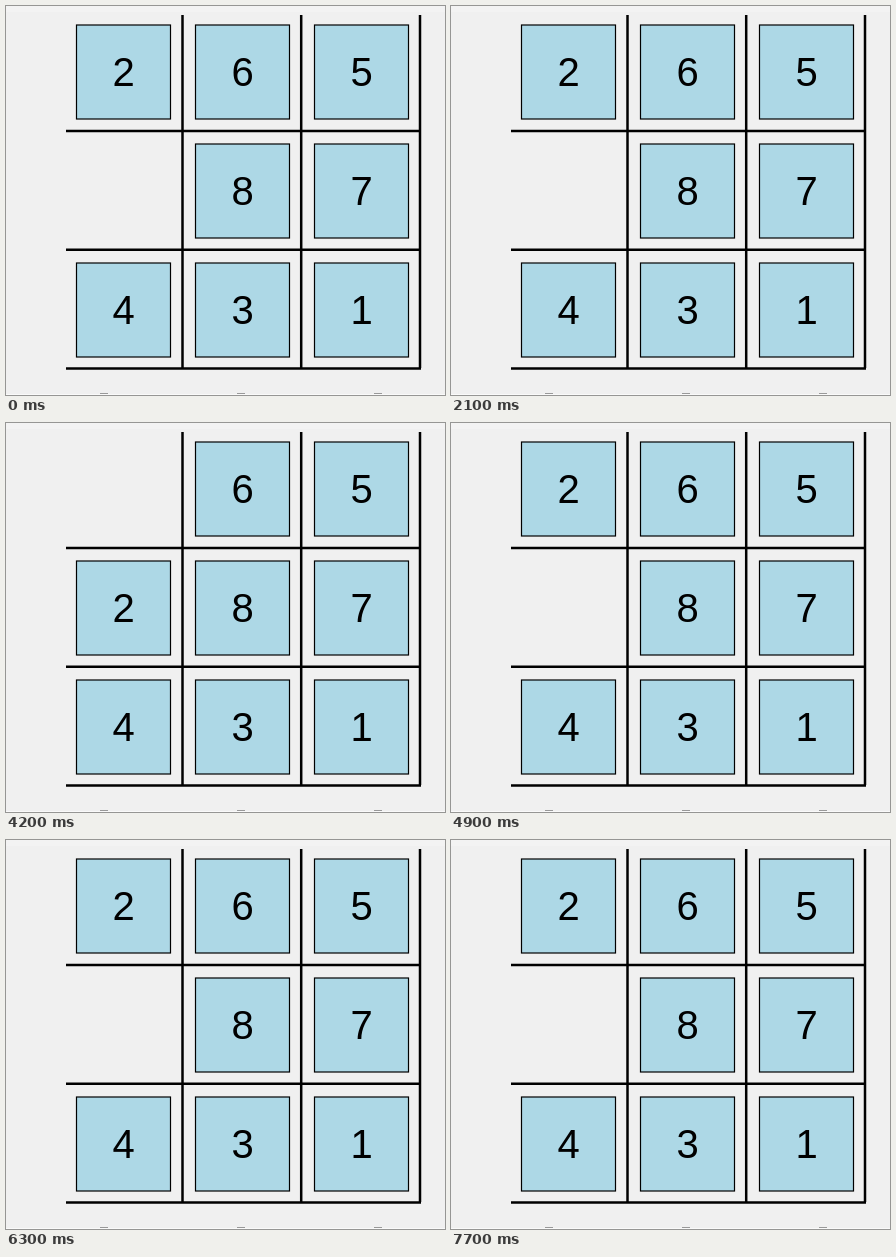
These frames come from a looping animation (439 px wide and 389 px high, 8 s). An HTML page:

```html
<!DOCTYPE html>
<html lang="en">
<head>
<meta charset="utf-8">
<title>Sliding puzzle</title>
<style>
  html, body { margin: 0; width: 100%; height: 100%; overflow: hidden; background: #f0f0f0; }
  svg { display: block; width: 439px; height: 389px; }
  .grid { fill: none; stroke: #000; stroke-width: 2.5; }
  .tile rect { fill: #add8e6; stroke: #000; stroke-width: 1.2; }
  .tile text { font: 40px "Liberation Sans", Arial, sans-serif; text-anchor: middle; }
</style>
</head>
<body>
<svg viewBox="0 0 439 389">
  <rect width="439" height="6" fill="#f3f3f3"/>
  <rect y="388" width="439" height="1" fill="#fafafa"/>
  <path d="M94 387.5h8M231 387.5h8M368 387.5h8" stroke="#999"/>
  <path class="grid" d="M176.5 9V362M295.2 9V362M414 9V362M60 125H414M60 243.7H414M60 362.4H415"/>
  <g id="tiles"></g>
</svg>
<script>
  const NS = "http://www.w3.org/2000/svg";
  const PITCH = 119, LOOP = 8000, STEP = 700;
  const board = ["265", " 87", "431"];
  const tiles = document.getElementById("tiles");

  function add(parent, name, attrs) {
    const el = document.createElementNS(NS, name);
    for (const key in attrs) el.setAttribute(key, attrs[key]);
    return parent.appendChild(el);
  }

  function place(tile, col, row) {
    tile.setAttribute("transform", `translate(${70 + col * PITCH} ${18.5 + row * PITCH})`);
  }

  function addTile(digit, col, row) {
    const tile = add(tiles, "g", { class: "tile" });
    add(tile, "rect", { x: 0.5, y: 0.5, width: 94, height: 94 });
    add(tile, "text", { x: 47.5, y: 61.5 }).textContent = digit;
    place(tile, col, row);
    return tile;
  }

  let mover;
  board.forEach((line, row) => [...line].forEach((digit, col) => {
    if (digit === " ") return;
    const tile = addTile(digit, col, row);
    if (digit === "2") mover = tile;
  }));

  // The "2" hops between the top and middle rows, resting one extra step at the start.
  let start;
  function frame(now) {
    start ??= now;
    const step = Math.floor(((now - start) % LOOP) / STEP);
    place(mover, 0, step >= 2 && step % 2 === 0 ? 1 : 0);
    requestAnimationFrame(frame);
  }
  requestAnimationFrame(frame);
</script>
</body>
</html>
```
